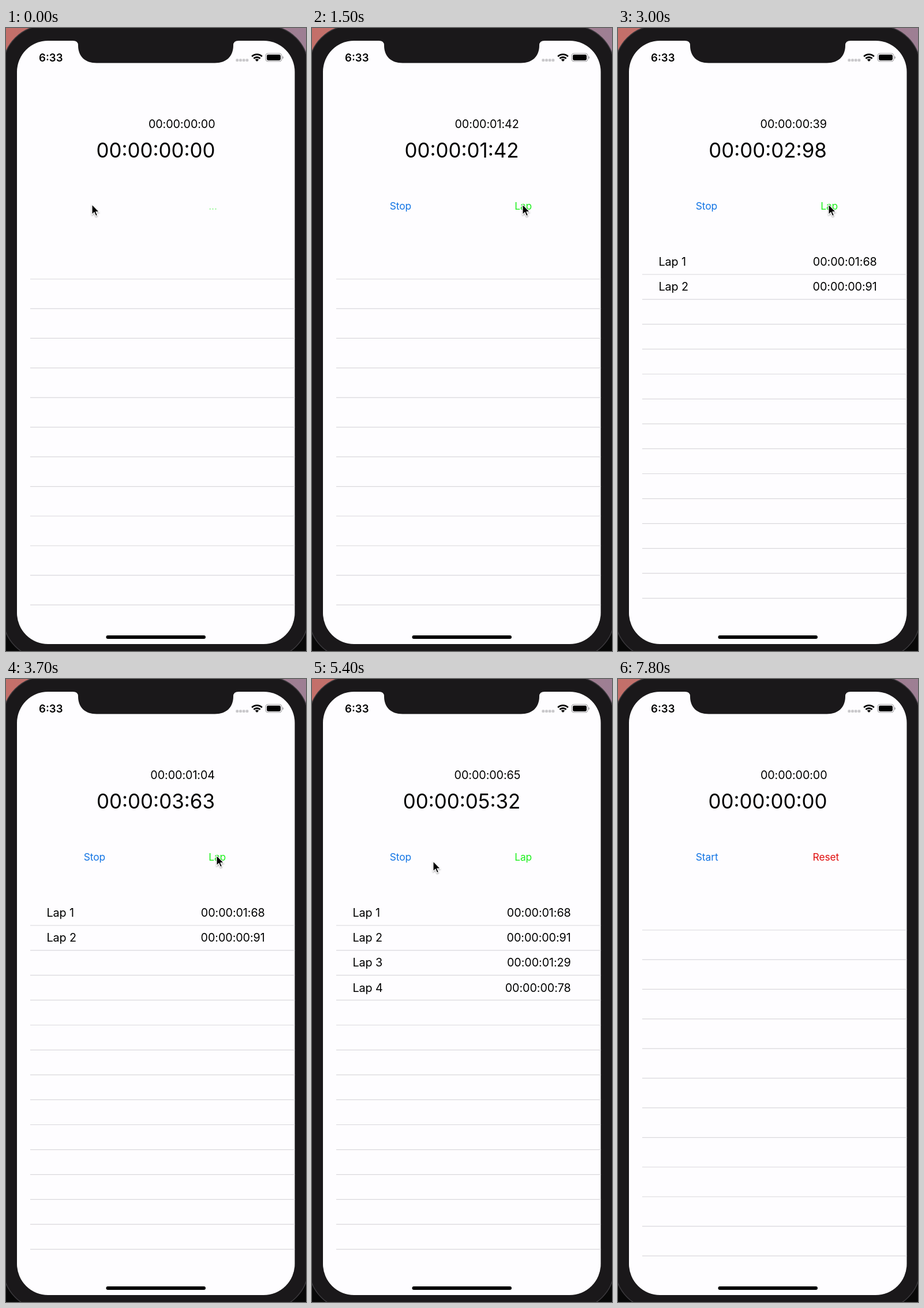
Recreate the animation shown at these times as an HTML page. Size 520 by 1077 pixels, loop 7900 ms.

```html
<!DOCTYPE html>
<html lang="en">
<head>
<meta charset="utf-8">
<title>Stopwatch</title>
<style>
  html, body { margin: 0; width: 100%; height: 100%; overflow: hidden; background: #1a181a; }
  svg { display: block; width: 520px; height: 1077px; font: 19.77px Inter, sans-serif; }
  .small { letter-spacing: -0.1px; }
  .big { font-size: 34.9px; }
  .button { font-size: 17.4px; letter-spacing: -0.1px; }
  .end { text-anchor: end; }
</style>
</head>
<body>
<svg viewBox="0 0 520 1077">
  <defs>
    <linearGradient id="wall">
      <stop offset="0" stop-color="#c46f69"/>
      <stop offset="1" stop-color="#9d7f94"/>
    </linearGradient>
    <filter id="shadow" x="-50%" y="-50%" width="200%" height="200%">
      <feDropShadow dx="0" dy="1.5" stdDeviation="1.2" flood-opacity=".4"/>
    </filter>
  </defs>

  <!-- phone -->
  <rect width="520" height="200" fill="url(#wall)"/>
  <rect y="200" width="520" height="877" fill="#080808"/>
  <rect x="-5" y="-4" width="529" height="1094" rx="72" fill="#1a181a" stroke="#3b393d" stroke-width="1.5"/>
  <rect x="19" y="22" width="481.5" height="1043" rx="54" fill="#fefdff"/>
  <path d="M116 20V22Q125 22 125 30C125 49 137 60.5 157 60.5H362C382 60.5 394 49 394 30Q394 22 403 22V20Z" fill="#1a181a"/>
  <rect x="173.5" y="1050" width="172.5" height="6" rx="3"/>

  <!-- status bar -->
  <text x="57" y="57.8" font-size="18.6" font-weight="600">6:33</text>
  <g fill="#c9c8cb">
    <rect x="398.4" y="53.2" width="4.8" height="4.8" rx="1.6"/>
    <rect x="404.1" y="53.2" width="4.8" height="4.8" rx="1.6"/>
    <rect x="409.8" y="53.2" width="4.8" height="4.8" rx="1.6"/>
    <rect x="415.5" y="53.2" width="4.8" height="4.8" rx="1.6"/>
  </g>
  <g fill="none" stroke="#000" stroke-width="2.8">
    <path d="M426.2 49.2A12.6 12.6 0 0 1 443.8 49.2"/>
    <path d="M429.4 52.8A8 8 0 0 1 440.6 52.8"/>
  </g>
  <path d="M435 58L431.8 54.8A4.6 4.6 0 0 1 438.2 54.8Z"/>
  <rect x="450.1" y="44" width="27.8" height="13.8" rx="4" fill="none" stroke="#99989b" stroke-width="1.1"/>
  <rect x="452" y="45.9" width="24" height="10" rx="2.4"/>
  <path d="M479.3 48.6Q481 49.4 481 51T479.3 53.4Z" fill="#99989b"/>

  <!-- app -->
  <g id="list"></g>
  <text id="lapTime" class="small end" y="173.3"></text>
  <text id="total" class="big" x="259.5" y="223.6" text-anchor="middle"></text>
  <text id="left" class="button" x="134.8" y="314.3" fill="#1274e4"></text>
  <text id="right" class="button" y="314.3"></text>
  <path id="cursor" d="M0 0V17.4L4 13.7L6.7 20L9.5 18.8L6.9 12.7H12.3Z" stroke="#fff" stroke-width="1.1" filter="url(#shadow)"/>
</svg>

<script>
const LOOP = 7900, STEP = 100, TICK = 130, TICK_LEAD = 25;
const STOP_AT = 5850, RESET_AT = 7450, CURSOR_GONE = 7700;
const GREEN = '#1cf01c', RED = '#e00f0f';
// each lap: press time and stopwatch tick
const laps = [[1720, 13], [2630, 20], [3930, 30], [4710, 36]];
// cursor path: time, x, y
const path = [
  [0, 149, 305], [350, 149, 305], [800, 298, 299], [1200, 365, 305],
  [4000, 365, 305], [4300, 366, 307], [4900, 366, 307], [5200, 290, 321],
  [5400, 210, 315], [5650, 152, 308], [6050, 152, 308], [6500, 270, 316],
  [6900, 362, 312], [LOOP, 362, 312]
];

const get = id => document.getElementById(id);
const clamp = v => Math.max(0, Math.min(1, v));
const pad = n => String(n).padStart(2, '0');

function add(name, attributes, text = '') {
  const node = document.createElementNS('http://www.w3.org/2000/svg', name);
  for (const key in attributes) node.setAttribute(key, attributes[key]);
  node.textContent = text;
  get('list').append(node);
  return node;
}

// the stopwatch truncates, losing a hundredth after the first few ticks
function clock(ticks) {
  const hundredths = ticks * 13 - (ticks > 8 ? 1 : 0);
  return `00:00:${pad(Math.floor(hundredths / 100))}:${pad(hundredths % 100)}`;
}

const lines = Array.from({ length: 14 }, () =>
  add('line', { x1: 42, x2: 500.5, stroke: '#d9d8dc', 'stroke-width': 1.2 }));

const rows = laps.map(([, tick], i) => {
  const y = 411.3 + i * 43.07;
  const previous = i ? laps[i - 1][1] : 0;
  return [
    add('text', { x: 70.4, y, class: 'small' }, `Lap ${i + 1}`),
    add('text', { x: 448.7, y, class: 'small end' }, clock(tick - previous))
  ];
});

function cursorAt(t) {
  const i = path.findIndex(point => point[0] > t);
  const [t0, x0, y0] = path[i - 1], [t1, x1, y1] = path[i];
  const k = (t - t0) / (t1 - t0);
  return [x0 + (x1 - x0) * k, y0 + (y1 - y0) * k];
}

// a tapped title dims, then recovers
const afterTap = age => age < 0 ? 1 : 0.2 + 0.8 * clamp(age / 350);

function setButton(node, text, opacity) {
  node.textContent = text;
  node.setAttribute('opacity', opacity);
}

function draw(t) {
  const reset = t >= RESET_AT, stopped = t >= STOP_AT;
  const ticks = reset ? 0 : Math.floor((Math.min(t, STOP_AT) + TICK_LEAD) / TICK);
  const done = reset ? [] : laps.filter(([time]) => t >= time);
  const last = done[done.length - 1] || [LOOP, 0];

  const total = get('total'), lapTime = get('lapTime');
  total.textContent = clock(ticks);
  lapTime.textContent = clock(ticks - last[1]);
  lapTime.setAttribute('x', 259.5 + total.getComputedTextLength() / 2);

  rows.forEach((row, i) => row.forEach(node =>
    node.setAttribute('visibility', i < done.length ? 'visible' : 'hidden')));
  const [top, pitch, count] = done.length ? [426, 43.06, 14] : [434, 51.22, 12];
  lines.forEach((line, i) => {
    line.setAttribute('y1', top + i * pitch);
    line.setAttribute('y2', top + i * pitch);
    line.setAttribute('visibility', i < count ? 'visible' : 'hidden');
  });

  const left = get('left'), right = get('right');
  right.setAttribute('x', stopped ? 337.6 : 351.2);
  right.setAttribute('fill', stopped ? RED : GREEN);
  if (stopped) {
    setButton(left, 'Start', afterTap(t - STOP_AT));
    setButton(right, 'Reset', afterTap(t - RESET_AT));
  } else {
    setButton(left, 'Stop', clamp(t / 250));
    setButton(right, t < 100 ? '...' : 'Lap', t < 100 ? 0.5 : afterTap(t - last[0]));
  }

  const cursor = get('cursor');
  cursor.setAttribute('transform', `translate(${cursorAt(t)})`);
  cursor.setAttribute('visibility', t < CURSOR_GONE ? 'visible' : 'hidden');
}

const start = performance.now();
function frame() {
  const elapsed = performance.now() - start;
  draw(Math.floor(elapsed / STEP) * STEP % LOOP);
  requestAnimationFrame(frame);
}
frame();
</script>
</body>
</html>
```
